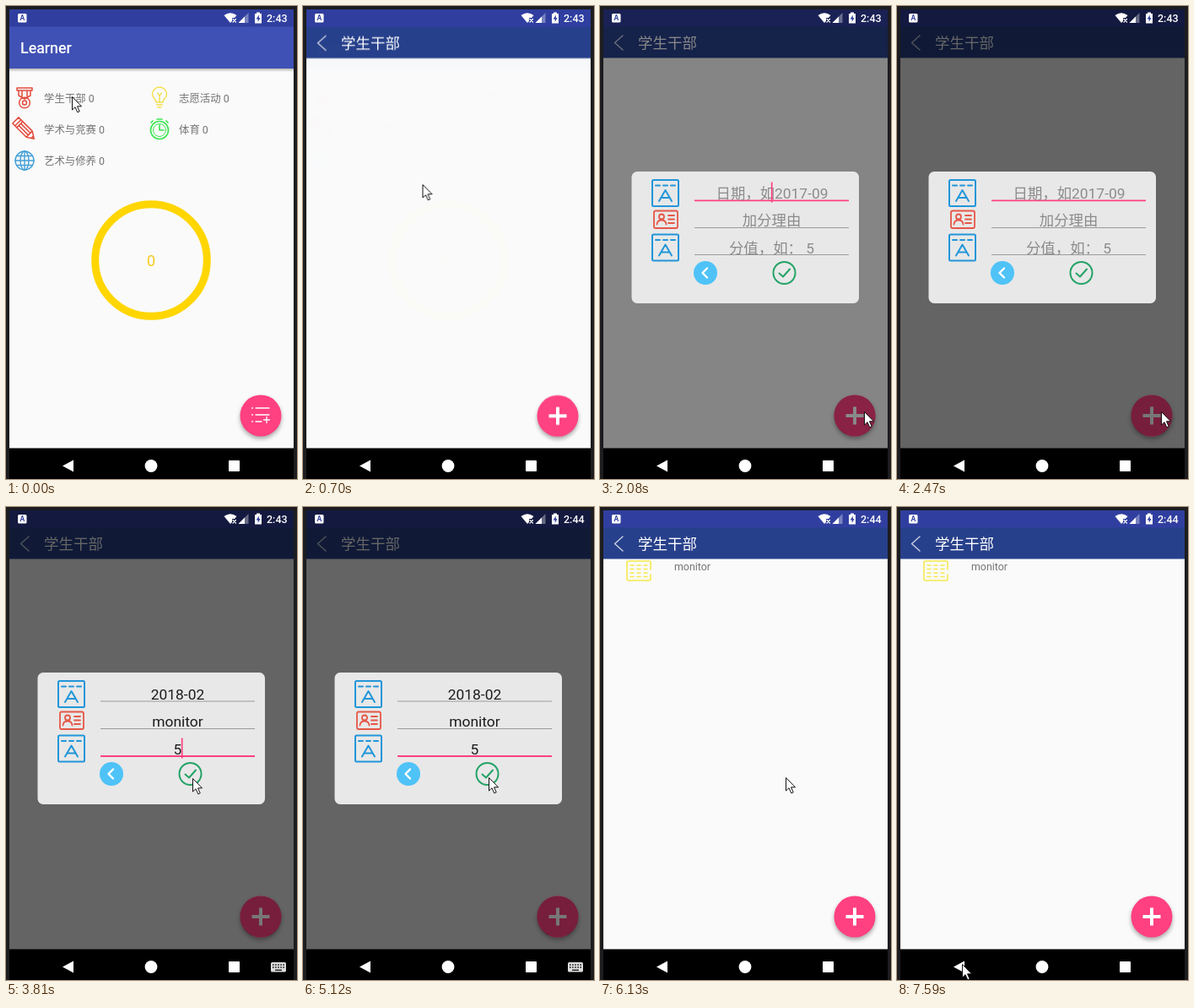
An HTML page for the animation above (8000 ms loop, 345 by 560 pixels).

```html
<!DOCTYPE html>
<html lang="zh-CN">
<head>
<meta charset="utf-8">
<title>Learner</title>
<style>
  html, body { margin: 0; width: 100%; height: 100%; overflow: hidden; background: #1d1d20; }
  svg { display: block; width: 345px; height: 560px; }
  text { font-family: Roboto, "Noto Sans CJK SC", "Noto Sans CJK", sans-serif; white-space: pre; }
  .line { fill: none; stroke-linecap: round; stroke-linejoin: round; }
  .label { font-size: 12.4px; fill: #757575; }
  .field { font-size: 17.4px; text-anchor: middle; }
  .hint { fill: #8b8b8b; }
  .mid { text-anchor: middle; }
  .shadow { filter: drop-shadow(0 3px 2.5px rgba(0, 0, 0, .32)); }

  /* One shared 8 s clock; 1% = 80 ms */
  .enter { animation: enter 8s ease-out infinite; }
  .cut { animation: 8s step-end infinite; }
  .dim { animation-name: dim; }
  .dialog { animation-name: dialog; }
  .shade { animation-name: shade; }
  .item { animation-name: item; }
  .before { animation-name: before; }
  .after { animation-name: after; }
  .keyboard { animation-name: keyboard; }
  .caret1 { animation-name: caret1; }
  .caret2 { animation-name: caret2; }
  .clock1 { animation-name: clock1; }
  .clock2 { animation-name: clock2; }
  .cursor { animation: cursor 8s linear infinite; }

  @keyframes enter {
    0%, 5.5% { opacity: 0; transform: translateY(42px); }
    9%, 100% { opacity: 1; transform: none; }
  }
  @keyframes dim {
    0% { opacity: 0; } 25.25% { opacity: .25; } 26% { opacity: .47; } 27.125% { opacity: .6; }
    75.125% { opacity: .46; } 75.875% { opacity: .2; } 76.625% { opacity: 0; }
  }
  @keyframes dialog {
    0% { opacity: 0; } 25.25% { opacity: .5; } 26% { opacity: 1; }
    75.125% { opacity: .3; } 75.875% { opacity: .1; } 76.625% { opacity: 0; }
  }
  @keyframes shade {
    0% { opacity: 0; } 24.25% { opacity: .1; } 25.25% { opacity: .3; } 26% { opacity: .46; }
    27.125% { opacity: .53; } 75.125% { opacity: .3; } 75.875% { opacity: .12; } 76.625% { opacity: 0; }
  }
  @keyframes item {
    0% { opacity: 0; } 75.125% { opacity: .1; } 75.875% { opacity: .6; } 76.625% { opacity: 1; }
  }
  @keyframes before { 0% { opacity: 1; } 47.625% { opacity: 0; } }
  @keyframes after { 0% { opacity: 0; } 47.625% { opacity: 1; } }
  @keyframes keyboard { 0% { opacity: 0; } 47.625% { opacity: 1; } 75.125% { opacity: 0; } }
  @keyframes caret1 {
    0% { opacity: 1; } 30.875% { opacity: 0; } 37% { opacity: 1; } 42% { opacity: 0; }
  }
  @keyframes caret2 {
    0% { opacity: 0; } 47.625% { opacity: 1; } 51.75% { opacity: 0; } 57.5% { opacity: 1; }
    64% { opacity: 0; } 70.125% { opacity: 1; }
  }
  @keyframes clock1 { 0% { opacity: 1; } 62.125% { opacity: 0; } }
  @keyframes clock2 { 0% { opacity: 0; } 62.125% { opacity: 1; } }
  @keyframes cursor {
    0%, 7% { transform: translate(78px, 107px); }
    9% { transform: translate(150px, 225px); }
    11% { transform: translate(285px, 445px); }
    12% { transform: translate(320px, 508px); }
    13.875%, 15.8% { transform: translate(314px, 481px); }
    15.875%, 35.9% { transform: translate(313px, 480px); }
    38% { transform: translate(309px, 512px); }
    40.1% { transform: translate(300px, 562px); }
    40.125%, 47.6% { transform: translate(300px, 580px); }
    47.625%, 51.74% { transform: translate(221px, 321px); }
    51.75%, 81% { transform: translate(220px, 320px); }
    82.5% { transform: translate(232px, 350px); }
    84.5% { transform: translate(243px, 388px); }
    86% { transform: translate(222px, 420px); }
    88% { transform: translate(130px, 468px); }
    89.5% { transform: translate(66px, 494px); }
    91.5% { transform: translate(74px, 524px); }
    92.25% { transform: translate(75px, 530px); }
    93.5% { transform: translate(76px, 542px); }
    94.8%, 100% { transform: translate(77px, 541px); }
  }
</style>
</head>
<body>
<svg viewBox="0 0 345 560">
  <defs>
    <linearGradient id="fade" x2="0" y2="1">
      <stop stop-opacity=".28"/><stop offset="1" stop-opacity="0"/>
    </linearGradient>
    <g id="letterBox" class="line" stroke="#2196d9" stroke-width="2">
      <rect x="1" y="1" width="31" height="31" rx="1.5"/>
      <path d="M5 7.5H10M14 7.5H19M23 7.5H28M9 26L16.5 13L24 26M12 22H21"/>
    </g>
  </defs>

  <!-- Home -->
  <rect x="4" y="4" width="337" height="520" fill="#fafafa"/>
  <rect x="4" y="74" width="337" height="4" fill="url(#fade)"/>
  <rect x="4" y="4" width="337" height="21" fill="#303f9f"/>
  <rect x="4" y="24.500" width="337" height="49.500" fill="#3f51b5"/>
  <text x="17" y="56" font-size="17.8" font-weight="500" fill="#fff">Learner</text>

  <g class="line" stroke="#e34b3d" stroke-width="1.5">
    <path d="M13 97H31V100H13ZM15 100V106L22 110L29 106V100M19 100V107M25 100V107"/>
    <circle cx="22" cy="114.500" r="6.300"/><circle cx="22" cy="114.500" r="2.500"/>
  </g>
  <g class="line" stroke="#f3df4c" stroke-width="1.400">
    <path d="M178 114C178 110 173.500 109 173.500 104.500A8.500 8.500 0 0 1 190.500 104.500C190.500 109 186 110 186 114ZM178.500 117H185.500M180 120H184M182 114V106L179.500 103M182 106L184.500 103"/>
  </g>
  <g class="line" stroke="#e34b3d" stroke-width="1.500" transform="translate(22 146) rotate(45)">
    <path d="M-15-5H8L16 0L8 5H-15ZM-11-5V5M-8-5V5M-8-1.700H8M-8 1.700H8M8-5V5M13-1.500V1.500"/>
  </g>
  <g class="line" stroke="#3fe455" stroke-width="1.700">
    <circle cx="182" cy="147" r="10.500"/><circle cx="182" cy="147" r="7.500" stroke-width="1"/>
    <path d="M182 141V147H187M179 134H185M172 138L174 136M192 138L190 136"/>
  </g>
  <g class="line" stroke="#439fd8" stroke-width="1.400">
    <circle cx="22" cy="183" r="11"/><ellipse cx="22" cy="183" rx="5" ry="11"/>
    <path d="M22 172V194M11 183H33M13 177.500H31M13 188.500H31"/>
  </g>
  <g class="label">
    <text x="45" y="113.500">学生干部 0</text><text x="205" y="113.500">志愿活动 0</text>
    <text x="45" y="150.500">学术与竞赛 0</text><text x="205" y="150.500">体育 0</text>
    <text x="45" y="187.500">艺术与修养 0</text>
  </g>

  <circle cx="172" cy="301" r="66.300" fill="none" stroke="#ffd600" stroke-width="9"/>
  <text class="mid" x="172" y="308" font-size="18" fill="#f5cb1c">0</text>

  <circle class="shadow" cx="302" cy="485" r="24.500" fill="#ff4081"/>
  <path class="line" stroke="#fff" stroke-width="1.300" d="M291.500 476H292.500M296 476H312M291.500 484H292.500M296 484H312M291.500 492H292.500M296 492H303M305.500 490H312.500M309 486.500V493.500"/>

  <!-- Category page -->
  <g class="enter">
    <rect x="4" y="4" width="337" height="520" fill="#fafafa"/>
    <rect x="4" y="4" width="337" height="21" fill="#303f9f"/>
    <rect x="4" y="24.500" width="337" height="37" fill="#27408b"/>
    <path class="line" stroke="#c6cce0" stroke-width="1.500" d="M27 35L17.500 43.500L27 52"/>
    <text x="45" y="50" font-size="17.500" fill="#fff">学生干部</text>
    <g class="cut item">
      <g class="line" stroke="#f6e94e" stroke-width="1.600">
        <path d="M60 74V66Q60 64 58 64H34Q32 64 32 66V85Q32 87 34 87H58Q60 87 60 85V80"/>
        <path d="M36 69H40M44 69H48M52 69H56M36 73.500H40M44 73.500H48M52 73.500H56M36 78H40M44 78H48M52 78H56M36 82.500H40M44 82.500H48M52 82.500H56"/>
      </g>
      <text class="label" x="88" y="74.500">monitor</text>
    </g>
  </g>
  <rect class="cut dim" x="4" y="4" width="337" height="520"/>
  <g class="enter">
    <circle class="shadow" cx="302" cy="485" r="24.500" fill="#ff4081"/>
    <path d="M291.500 485H312.500M302 474.500V495.500" stroke="#fff" stroke-width="4"/>
    <circle class="cut shade" cx="302" cy="485" r="24.600"/>
  </g>

  <!-- Entry dialog -->
  <g class="cut dialog">
    <rect x="37.500" y="196" width="269.500" height="156" rx="6.500" fill="#e8e8e8"/>
    <use href="#letterBox" x="61" y="205"/>
    <use href="#letterBox" x="61" y="269.500"/>
    <g class="line" stroke="#e65748" stroke-width="1.800">
      <rect x="64" y="242.500" width="28" height="20.500" rx="2"/>
      <circle cx="73" cy="249.500" r="3"/>
      <path d="M67.500 258.500Q68 253.500 73 253.500T78.500 258.500M81 248H88M81 252.500H88M81 257H88"/>
    </g>
    <path d="M112 262.500H295" stroke="#9b9b9b"/>
    <g class="cut before">
      <path d="M112 230.300H295" stroke="#ff4081" stroke-width="1.800"/>
      <path d="M112 294.500H295" stroke="#9b9b9b"/>
      <g class="field hint">
        <text x="204" y="228">日期，如2017-09</text>
        <text x="203.500" y="260">加分理由</text>
        <text x="203.500" y="293">分值，如： 5</text>
      </g>
      <path class="cut caret1" d="M203.700 208.500V232.500" stroke="#ff4081" stroke-width="1.700"/>
    </g>
    <g class="cut after">
      <path d="M112 230H295" stroke="#9b9b9b"/>
      <path d="M112 295H295" stroke="#ff4081" stroke-width="1.800"/>
      <g class="field" fill="#1c1c1c">
        <text x="203.500" y="228">2018-02</text>
        <text x="203.500" y="260">monitor</text>
        <text x="203.500" y="293">5</text>
      </g>
      <path class="cut caret2" d="M208.700 273.500V297.500" stroke="#ff4081" stroke-width="1.700"/>
    </g>
    <circle cx="125" cy="316" r="14" fill="#4fc3f7"/>
    <path class="line" stroke="#fff" stroke-width="2.400" d="M127 310.500L121.500 316L127 321.500"/>
    <g class="line" stroke="#24a366" stroke-width="2">
      <circle cx="218.500" cy="316" r="13"/><path d="M212.500 316.500L217 320.500L225 311.500"/>
    </g>
  </g>

  <!-- System bars -->
  <g fill="#fff">
    <rect x="14" y="9" width="10.500" height="10.500" rx="1.500"/>
    <text class="mid" x="19.250" y="17.300" font-size="8.500" font-weight="700" style="fill:#303f9f">A</text>
    <path d="M258.500 11Q266 5.500 273.500 11L271 14H268V18L266 20Z"/>
    <path class="line" stroke="#fff" stroke-width="1.200" d="M269 15.500L272.500 19M272.500 15.500L269 19"/>
    <path d="M287.500 8V20H275.500Z" opacity=".35"/><path d="M283 12.500V20H275.500Z"/>
    <path d="M297 9V7.500H301V9H303V20.500H295V9Z"/>
    <path d="M299.800 10.500L296.700 15.500H298.700V19L301.500 14H299.800Z" fill="#303f9f"/>
    <g font-size="12.500" font-weight="500">
      <text class="cut clock1" x="309" y="19">2:43</text>
      <text class="cut clock2" x="309" y="19">2:44</text>
    </g>
  </g>
  <rect x="4" y="523.500" width="337" height="37"/>
  <g fill="#fff">
    <path d="M67 544.500L80 537.500V551.500Z"/>
    <circle cx="172" cy="544.500" r="7.400"/>
    <rect x="264" y="538" width="13" height="13" rx=".8"/>
  </g>
  <g class="cut keyboard">
    <rect x="314" y="539" width="18" height="11.500" rx="1.500" fill="#ddd"/>
    <path d="M316 542H330M316 545H330" stroke="#111" stroke-width="1.500" stroke-dasharray="1.600 1.500"/>
    <path d="M319 548.300H327" stroke="#111" stroke-width="1.300"/>
  </g>

  <path class="cursor" fill="#fff" stroke="#111" stroke-width="1" d="M.5.5V16L4 12.700L6.800 18.800L9.200 17.800L6.500 11.800H11.500Z"/>
</svg>
</body>
</html>
```
